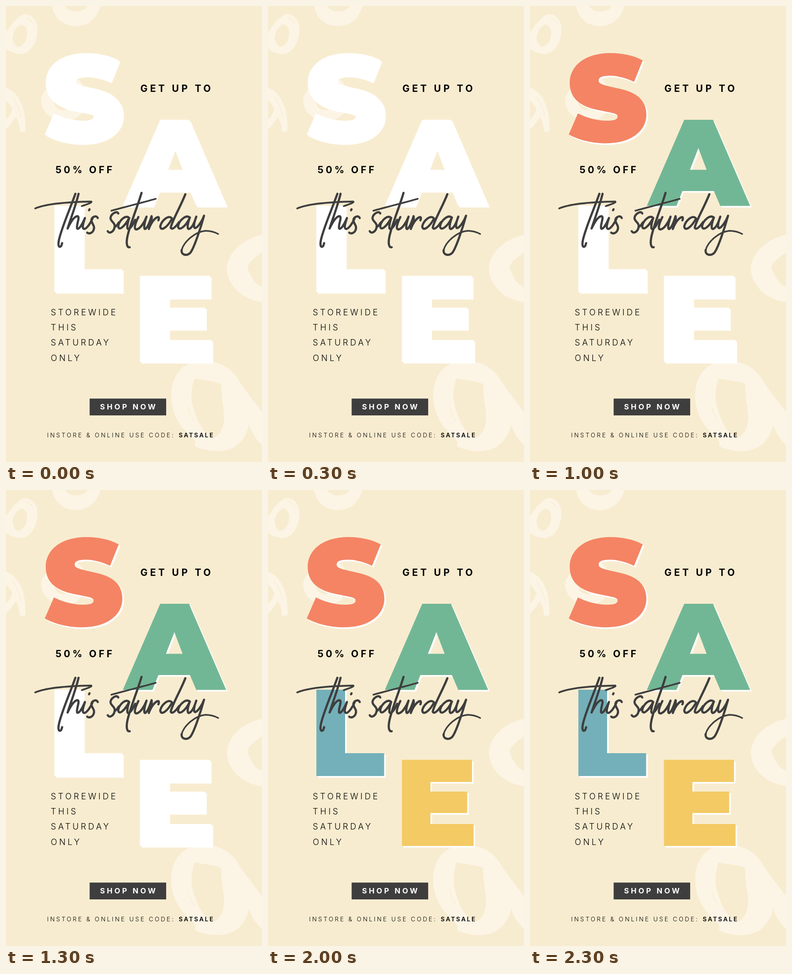
Recreate the animation shown at these times as an HTML page. Size 561x998 px, loop 2500 ms.

```html
<!DOCTYPE html>
<html lang="en">
<head>
<meta charset="utf-8">
<title>Saturday sale</title>
<style>
  html, body { margin: 0; width: 100%; height: 100%; overflow: hidden; background: #f8ecd0; }
  svg { display: block; width: 100vw; height: 100vh; }
  text { font-family: Inter, "Open Sans", sans-serif; white-space: pre; }
  .bold { font-weight: 700; font-size: 21px; }
  .light { font-weight: 300; font-size: 18.4px; letter-spacing: 4.55px; }
  .brush { fill: #fcf5e6; fill-rule: evenodd; }
  .streak { fill: none; stroke: #f8ecd0; stroke-width: 1.4; stroke-linecap: round; }
  .script { fill: none; stroke: #3e3e3e; stroke-width: 4.8; stroke-linecap: round; stroke-linejoin: round; }
</style>
</head>
<body>
<svg viewBox="0 0 561 998" preserveAspectRatio="none">
  <rect width="561" height="998" fill="#f8ecd0"/>

  <g class="brush">
    <path d="M-5 62C2 58 6 46 20 32C26 26 32 20 39 18C55 17 64 28 68 42C72 70 58 104 32 105C12 104 2 96-5 88Z
      M34 40C46 44 48 56 46 66C44 80 36 88 26 90C16 84 13 72 15 64C18 52 24 44 34 40Z"/>
    <path d="M101-5C102 22 122 44 154 44C186 43 203 20 208-5L178-5C182 4 168 12 154 12C140 12 130 5 127-5Z"/>
    <path d="M-3 178C18 183 34 205 40 235C42 250 44 268 42 274C38 276 31 275 30 274C31 262 26 250 22 243
      C16 250 8 266-3 271L-3 250C6 245 12 235 14 225C8 215 4 208-3 205Z"/>
    <path d="M150 161C166 160 173 178 174 200C175 232 158 251 130 251C98 251 77 230 77 207C78 190 90 178 104 174C120 170 135 162 150 161Z
      M122 181C108 186 104 200 106 214C110 226 122 230 132 227C146 218 148 200 142 188Z"/>
    <path d="M565 500C520 508 484 540 484 577C486 612 520 646 565 648L565 616C552 612 545 606 541 598
      C536 588 530 580 529 569C534 560 545 550 565 536Z"/>
    <path d="M430 776C470 778 492 792 507 815C525 845 545 865 565 895L565 964C550 952 538 935 533 915
      C528 940 510 974 465 974C440 974 420 968 414 962C418 955 412 948 404 940C380 920 362 890 362 850C364 800 395 777 430 776Z
      M413 815C440 820 465 822 472 828C470 850 478 880 478 900C478 925 468 940 455 945C430 938 415 900 408 870C404 850 408 830 413 815Z"/>
  </g>
  <path class="streak" d="M44 25Q54 28 58 38M14 199Q27 217 33 243M398 877Q403 895 412 909"/>

  <g id="letters"></g>

  <g class="bold">
    <text x="294.5" y="187.5" letter-spacing="5.4">GET UP TO</text>
    <text x="108.5" y="366" letter-spacing="5">50% OFF</text>
  </g>
  <g class="light">
    <text x="98" y="676.5">STOREWIDE</text>
    <text x="98" y="710">THIS</text>
    <text x="98" y="743">SATURDAY</text>
    <text x="98" y="776.5">ONLY</text>
  </g>

  <rect x="183.3" y="859.2" width="167.7" height="36.8" fill="#3e3e3e"/>
  <text x="206" y="882.5" font-size="16.5" font-weight="700" letter-spacing="4.2" fill="#fff">SHOP NOW</text>
  <text x="90" y="944.3" font-size="13.2" font-weight="300" letter-spacing="3.3">INSTORE &amp; ONLINE USE CODE:</text>
  <text x="378.5" y="944.3" font-size="13.2" font-weight="600" letter-spacing="2.75">SATSALE</text>

  <g class="script" role="img" aria-label="this saturday">
    <path d="M64 443C85 434 130 429 187 428C190 430 178 434 166 438" stroke-width="3.8"/>
    <path d="M152 411C140 445 122 485 116 512C114 522 115 527 118 527C121 527 122 523 123 519"/>
    <path d="M159 411C152 440 140 470 135 487C142 472 150 460 157 460C163 462 153 480 156 487C160 490 167 478 173 464
      C169 476 166 487 171 488C177 488 187 473 190 464M182 447l1-2"/>
    <path d="M201 464C199 458 189 460 187 468C187 476 196 481 192 490C189 498 181 499 178 496"/>
    <path d="M246 454C243 447 230 455 229 464C229 472 240 474 238 484C236 495 226 499 223 493M238 484Q243 481 247 474"/>
    <path d="M270 464C263 456 249 468 246 481C246 494 259 484 270 464C266 476 264 488 268 488C274 487 278 478 283 468"/>
    <path d="M297 409C288 440 271 480 266 505C263 520 265 529 271 528"/>
    <path d="M231 448C260 440 300 430 328 422" stroke-width="3.8"/>
    <path d="M290 462C283 476 279 489 286 489C294 488 303 474 308 461C303 476 301 488 305 488C311 485 315 473 319 460
      C321 466 316 480 313 488C318 474 327 462 334 462C336 464 335 467 334 469"/>
    <path d="M363 464C355 457 341 470 338 482C339 495 354 484 364 465M393 412C382 440 364 470 361 485C364 492 373 482 379 473"/>
    <path d="M403 463C395 456 380 468 377 482C378 494 393 484 403 463C398 476 396 488 401 488C408 486 413 474 417 461
      C412 474 410 486 415 486C421 484 430 470 434 459C427 485 412 530 404 540C396 548 383 545 385 534"/>
    <path d="M385 534C390 515 415 494 437 492C448 492 456 494 465 499" stroke-width="3.4"/>
  </g>
</svg>
<script>
  const STEP = 500, LOOP = 2500, SHADOW = 3.4;
  const letters = [
    ["#f48464", "M247 119C227 108 201 103 177 103C119 103 87 132 87 168C87 208 119 221 146 227C178 234 192 234 192 242" +
      "C192 249 183 251 168 251C148 251 124 245 105 235L85 281C105 293 137 300.5 166 300.5C225 300.5 255 271 255 238" +
      "C255 199 223 187 196 181C165 174 150.5 172 150.5 163C150.5 156 158 152.5 175 152.5C191 152.5 209 157 228 166Z"],
    ["#72b795", "M338 249H401L482.5 437.5H417L403 405H334L321 437.5H256ZM369 311L350.5 358.5H387Z"],
    ["#74b0b9", "M106 437H169V576H254.5V626H106Z"],
    ["#f4ca65", "M293.5 590.5H447V639H356V660H436.5V707H356V731H450.5V779H293.5Z"]
  ];
  const group = document.getElementById("letters");

  function addPath(d, shift) {
    const p = document.createElementNS("http://www.w3.org/2000/svg", "path");
    p.setAttribute("d", d);
    p.setAttribute("fill", "#fff");
    p.setAttribute("fill-rule", "evenodd");
    p.setAttribute("transform", `translate(${shift} ${shift})`);
    return group.appendChild(p);
  }

  // Each letter snaps from white to its colour one step after the last.
  letters.forEach(([color, d], i) => {
    const at = (i + 1) * STEP / LOOP;
    addPath(d, SHADOW);
    addPath(d, 0).animate([
      { fill: "#fff", offset: 0 },
      { fill: "#fff", offset: at },
      { fill: color, offset: at },
      { fill: color, offset: 1 }
    ], { duration: LOOP, iterations: Infinity });
  });
</script>
</body>
</html>
```
